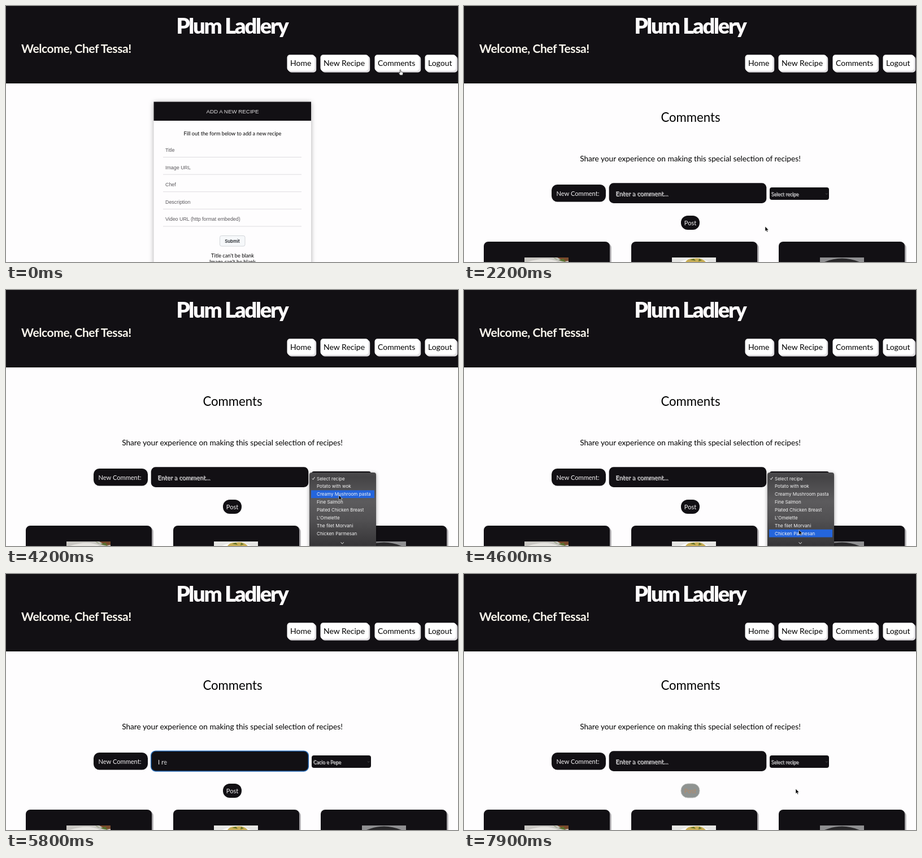
Recreate the animation shown at these times as an HTML page. Size 800 px wide and 453 px high, loop 8000 ms.

```html
<!DOCTYPE html>
<html lang="en">
<head>
<meta charset="utf-8">
<title>Recipe comments</title>
<style>
html, body { margin: 0; width: 100%; height: 100%; overflow: hidden; background: #fefdfe; }
svg { display: block; width: 800px; height: 453px; font-family: Lato, sans-serif; }
.mid { text-anchor: middle; }
.arial { font-family: "Liberation Sans", Arial, sans-serif; }
.ui { font-family: Inter, sans-serif; }
.ink { fill: #121014; }
.hint { fill: #8a888c; filter: drop-shadow(1px 1px 0 #eee); }
.typed { fill: #2a282c; filter: drop-shadow(1px 1px 0 #fff); }
</style>
</head>
<body>
<svg viewBox="0 0 800 453">
  <rect width="800" height="453" fill="#fefdfe"/>
  <rect class="ink" width="800" height="137"/>
  <text class="mid" x="400" y="49" font-size="38" font-weight="900" letter-spacing="-2.2" fill="#fdfbfc">Plum Ladlery</text>
  <text x="27" y="83" font-size="21" font-weight="700" letter-spacing="-.4" fill="#fbf7ee">Welcome, Chef Tessa!</text>
  <g id="nav" font-size="14"></g>

  <g id="form">
    <rect x="261.5" y="169.5" width="278.5" height="310" fill="#fefdfe" style="filter:drop-shadow(0 1px 4px #0005)"/>
    <rect class="ink" x="261.5" y="169.5" width="278.5" height="33.5"/>
    <text class="mid arial" x="401" y="189.6" font-size="9.75" fill="#e2e0e2">ADD A NEW RECIPE</text>
    <text class="mid" x="401" y="229" font-size="9.2">Fill out the form below to add a new recipe</text>
    <g id="fields" class="arial" font-size="8.9" fill="#5a585c"></g>
    <rect x="378.5" y="406.5" width="44.5" height="18.5" rx="3" fill="#f6f8fa" stroke="#d3d6da"/>
    <text class="mid ui" x="400.5" y="418.7" font-size="7.8" font-weight="600" fill="#24292e">Submit</text>
    <g class="mid" font-size="9.2">
      <text x="401" y="445">Title can't be blank</text>
      <text x="401" y="455.5">Image can't be blank</text>
    </g>
  </g>

  <g id="comments">
    <text class="mid" x="401" y="205" font-size="22.2">Comments</text>
    <text class="mid" x="400.5" y="275.3" font-size="13.7">Share your experience on making this special selection of recipes!</text>
    <rect class="ink" x="155" y="316" width="96" height="30.5" rx="10"/>
    <text x="163.5" y="335.5" font-size="11.1" fill="#f4f2f4">New Comment:</text>
    <rect id="input" class="ink" x="256.7" y="313.3" width="278.6" height="35.6" rx="8" stroke-width="1.5"/>
    <text id="entry" x="268" y="336" font-size="11.4"></text>
    <rect class="ink" x="541" y="321" width="105" height="22" rx="4"/>
    <text id="choice" class="hint" x="543.5" y="335.5" font-size="8.7"></text>
    <path d="M640 331.500l1.800 1.800 1.800-1.800" fill="none" stroke="#666" stroke-width=".7"/>
    <rect id="post" x="384" y="371" width="33" height="25" rx="12"/>
    <text id="postText" class="mid" x="400.5" y="388" font-size="11.1">Post</text>
    <g id="cards"></g>
    <g id="photos">
      <g>
        <rect x="107" y="445" width="78" height="8" fill="#c9c7c3"/>
        <path d="M113 453q32-11 54 0z" fill="#e8e6e2"/>
        <path d="M165 445h20v6l-8 1z" fill="#7a4a2c"/>
        <path d="M158 445q8 7 18 2l4 6-9-2z" fill="#59712f"/>
      </g>
      <g>
        <rect x="368" y="445" width="78" height="8" fill="#e6e6e4"/>
        <path d="M382 453q25-13 52 0z" fill="#fafaf8"/>
        <path d="M392 453q4-7 14-6 14-3 22 6z" fill="#c9ae55"/>
        <path d="M400 449l7-2 3 4zM416 447l5 3-6 2z" fill="#64752c"/>
      </g>
      <g>
        <rect x="630" y="445" width="78" height="8" fill="#8f8f91"/>
        <path d="M638 453q31-13 62 0z" fill="#29282a"/>
      </g>
    </g>
  </g>

  <g id="menu" class="ui" font-size="8.05" fill="#f5f5f5">
    <!-- Translucent panel: darker where it lies over the select and the card -->
    <defs><linearGradient id="shade" gradientUnits="userSpaceOnUse" x1="0" y1="295" x2="0" y2="453">
      <stop stop-color="#5c5b5d"/><stop offset=".23" stop-color="#454446"/><stop offset=".5" stop-color="#5c5b5d"/>
      <stop offset=".7" stop-color="#525153"/><stop offset="1" stop-color="#363537"/>
    </linearGradient></defs>
    <rect id="panel" x="537" width="118" rx="4" fill="url(#shade)" style="filter:drop-shadow(0 1px 3px #0006)"/>
    <rect id="mark" x="540" width="112" height="13.8" fill="#2465dc"/>
    <g id="rows"></g>
    <path id="more" d="M592.500 446.500l2.700 2.500 2.700-2.500" fill="none" stroke="#f3f3f3"/>
  </g>

  <g id="status">
    <path d="M0 446h85q3 0 3 3v4H0z" fill="#38373a"/>
    <text class="ui" x="2" y="453.5" font-size="6.8" fill="#eee">localhost:4000/comments</text>
  </g>
  <path id="arrow" d="M0 0v8.700l2-1.800 1.300 3 1.500-.6-1.300-2.900h2.700z" fill="#000" stroke="#fff" stroke-width=".6"/>
  <path id="hand" d="M-.8 0q.9-.9 1.600.2v3.300l3.100.8q1 .4.800 1.600l-.7 3.300H-.6L-3 5.600q.3-1.300 2.200.1z" fill="#fff" stroke="#222" stroke-width=".7"/>
</svg>
<script>
const $ = id => document.getElementById(id);
const show = (id, on) => $(id).setAttribute('visibility', on ? 'visible' : 'hidden');
const put = (id, attrs) => { for (const k in attrs) $(id).setAttribute(k, attrs[k]); };

// Rounded box with a stepped hard shadow
const raised = (x, y, w, h, r, fill, shade) => [3, 2, 1, 0].map(d =>
  `<rect x="${x + d * .9}" y="${y + d * .9}" width="${w}" height="${h}" rx="${r}" fill="${d ? shade : fill}"/>`).join('');

const lightShade = '#e2e0e3', darkShade = '#5e5c60';
const links = [['Home', 497.5, 49], ['New Recipe', 556.5, 85], ['Comments', 652.5, 79], ['Logout', 741.5, 55]];
$('nav').innerHTML = links.map(([s, x, w]) =>
  `<g>${raised(x, 86.2, w, 28.6, 5, '#fff', lightShade)}</g><text x="${x + 5.5}" y="106">${s}</text>`).join('');
const shadow = [...$('nav').querySelectorAll('g')[2].children].slice(0, 3);

$('fields').innerHTML = ['Title', 'Image URL', 'Chef', 'Description', 'Video URL (http format embeded)'].map((s, i) => {
  const y = 267.5 + i * 30.6;
  return `<text x="282" y="${y - 9.5}">${s}</text><path d="M278 ${y}h245" stroke="#dedce0"/>`;
}).join('');

$('cards').innerHTML = [35, 296, 557].map(x => raised(x, 417, 223, 60, 8, '#121014', '#aaa8ab')).join('');

const rowH = 13.87;
const dishes = ['Select recipe', 'Potato with wok', 'Creamy Mushroom pasta', 'Fine Salmon', 'Plated Chicken Breast',
  "L'Omelette", 'The filet Morvani', 'Chicken Parmesan', 'Dal Makhani', 'Cacio e Pepe', 'Butter Poached Fish'];
$('rows').innerHTML = dishes.map((s, i) => `<text x="550" y="${i * rowH + 3}">${s}</text>`).join('') +
  '<path d="M542 0l1.500 2 3-4.500" fill="none" stroke="#f3f3f3"/>';
const rowTexts = $('rows').querySelectorAll('text');

// Pointer stops: time, x, y
const path = [[0, 698, 113], [200, 694, 110], [1100, 694, 110], [1400, 600, 325], [1600, 600, 325], [1900, 545, 386],
  [2200, 533, 390], [2400, 533, 390], [2900, 572, 331], [3500, 572, 331], [4200, 589, 363], [4800, 594, 446],
  [5000, 594, 446], [5300, 592, 432], [5400, 592, 432], [5700, 420, 334], [6500, 420, 334], [7000, 403, 384],
  [7500, 403, 384], [7900, 587, 380], [8000, 587, 380]];

function pointer(t) {
  const i = path.findIndex(p => p[0] > t);
  const [a, b] = [path[i - 1], path[i]];
  const u = (t - a[0]) / (b[0] - a[0]), e = u * u * (3 - 2 * u);
  return [a[1] + (b[1] - a[1]) * e, a[2] + (b[2] - a[2]) * e];
}

const message = 'I really love this recipe!!!';

function draw(t) {
  const [x, y] = pointer(t);
  const onForm = t < 400;
  show('form', onForm);
  show('comments', !onForm);
  show('photos', t >= 900);
  show('status', t >= 400 && t < 1300);

  const pressed = t >= 200 && t < 1200;
  shadow.forEach(r => r.setAttribute('fill', pressed ? darkShade : lightShade));

  const focus = t >= 5700 && t < 7000, sent = t >= 7400;
  const typed = sent ? '' : message.slice(0, Math.max(0, Math.round((t - 5700) / 650 * message.length)));
  put('input', { stroke: focus ? '#2468b4' : 'none' });
  put('entry', { class: typed ? 'typed' : 'hint' });
  $('entry').textContent = typed || 'Enter a comment...';
  $('choice').textContent = t >= 5500 && !sent ? 'Cacio e Pepe' : dishes[0];

  const hover = t >= 7000;
  put('post', { fill: hover ? '#8f9391' : '#121014', stroke: hover ? '#c4c6c4' : 'none' });
  put('postText', { fill: hover ? '#b58a68' : '#f4f2f4' });

  const lift = Math.min(1, Math.max(0, (t - 4700) / 200));
  const full = lift === 1;
  const top = 333.5 - 2.05 * rowH * lift;
  const row = Math.round((y - top) / rowH);
  const fits = i => full || i < 8;
  show('menu', t >= 3400 && t < 5500);
  put('panel', { y: top - 10.5, height: 480 - top });
  put('rows', { transform: `translate(0 ${top})` });
  rowTexts.forEach((e, i) => e.setAttribute('display', fits(i) ? '' : 'none'));
  put('mark', { y: top + row * rowH - 6.9, display: fits(row) ? '' : 'none' });
  put('more', { display: full ? 'none' : '' });

  const hand = t < 1300;
  show('hand', hand);
  show('arrow', !hand && (t < 5800 || t >= 6500));
  put('hand', { transform: `translate(${x} ${y})` });
  put('arrow', { transform: `translate(${x} ${y})` });
}

function tick(now) {
  draw(Math.floor(now % 8000 / 100) * 100);
  requestAnimationFrame(tick);
}
draw(0);
requestAnimationFrame(tick);
</script>
</body>
</html>
```
